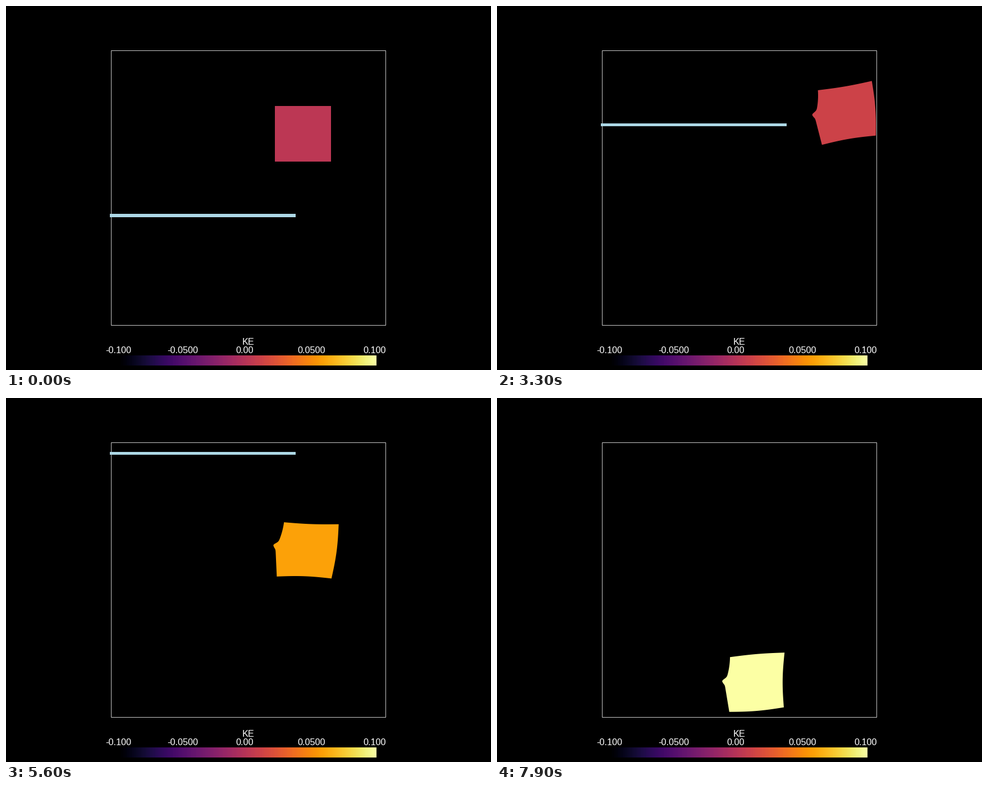
A matplotlib script that plays this animation: 864 by 648 pixels, repeating every 8000 ms.

```python
import matplotlib.pyplot as plt
import numpy as np
from matplotlib.animation import FuncAnimation
from matplotlib.patches import Polygon, Rectangle

W, H, DPI = 864, 648, 100
FRAMES, STEP = 80, 0.1
LEFT, TOP, SIDE = 187.5, 79.5, 489
WALL, FLOOR = LEFT + SIDE - 1, TOP + SIDE - 0.5
GRAVITY = 48
BAR_TIP, BAR_TOP, BAR_SPEED = 515.5, 370.7, 48.95
CMAP = plt.get_cmap("inferno")

# Free flights: anchor time, (x, y, angle), velocity, angular acceleration
FLIGHTS = [
    (0.0, (528.75, 227.25, 0), (0, 0, 0), 0),
    (2.5, (598, 208.2, 62), (68, -31, 51.5), 0),
    (3.3, (623.3, 190.3, 83), (-37.3, -20, 8.7), -3.1),
    (7.9, (463, 506, 88), (-5, -125, -8), 0),
]
# Contacts between them (bar, wall, floor): start, end, vertical squash
CONTACTS = [(1.2, 1.52, 0.08), (2.8, 3.3, 0), (7.44, 7.9, 0.18)]


def ease(t, start, end):
    s = np.clip((t - start) / (end - start), 0, 1)
    return s * s * (3 - 2 * s)


def fly(k, t):
    """Position and velocity on flight k."""
    t0, pos, vel, turn = FLIGHTS[k]
    acc, d = np.array([0, GRAVITY, turn]), t - t0
    return pos + np.array(vel) * d + acc * d * d / 2, vel + acc * d


def state(t):
    """x, y and angle; a contact joins two flights with a cubic."""
    for k, (a, b, _) in enumerate(CONTACTS):
        if t <= a:
            return fly(k, t)[0]
        if t < b:
            (p, u), (q, v) = fly(k, a), fly(k + 1, b)
            d = b - a
            s = (t - a) / d
            return (p + (q - p) * s * s * (3 - 2 * s)
                    + d * s * (1 - s) * (u * (1 - s) - v * s))
    return fly(len(CONTACTS), t)[0]


def energy(t, e=1e-4):
    vx, vy, spin = (state(t + e) - state(t - e)) / (2 * e)
    speed = np.hypot(np.hypot(vx, vy), 1.63 * spin)
    return 0.1 * (speed / 124) ** 2.3


def bar_top(t):
    return BAR_TOP - BAR_SPEED * t


def edge(a, b, s, offset):
    """Points from a to b, pushed outward by offset."""
    normal = 1j * (b - a) / abs(b - a)
    return a + (b - a) * s + normal * offset


def outline(t):
    x, y, angle = state(t)
    hurt = ease(t, 1.2, 1.5)

    # Slightly sheared square, from bottom-left round to top-left
    half = 49.75 - hurt
    shear = np.exp(1j * np.radians(2.75) * hurt)
    u, v = half * shear, 1j * half / shear
    corners = [v - u, v + u, u - v, -u - v]

    # The struck edge swells towards a small nub; the others bow
    s = np.linspace(0, 1, 121)
    swell = np.minimum(8 * (s / 0.46) ** 2, 17.5 * (1 - s))
    nub = 6 * np.exp(-((s - 0.435) / 0.05) ** 2)
    offsets = [(swell + nub) * ease(t, 1.2, 1.8)]
    bow = -hurt + 2 * ease(t, 1.5, 2.6) - 2 * ease(t, 7.44, 7.9)
    offsets += [b * bow * np.sin(np.pi * s) for b in (-2.3, 2.7, -1.5)]

    z = np.concatenate([edge(corners[k], corners[(k + 1) % 4], s, offset)
                        for k, offset in enumerate(offsets)])
    z = z * np.exp(1j * np.radians(angle))
    q = sum(amount * np.sin(np.pi * np.clip((t - a) / (b - a), 0, 1))
            for a, b, amount in CONTACTS)
    px, py = x + z.real * (1 + q / 2), y + z.imag * (1 - q)

    # Obstacles hold the material back
    if t < 2:
        py = np.where(px < BAR_TIP, np.minimum(py, bar_top(t)), py)
    return np.column_stack([np.minimum(px, WALL), np.minimum(py, FLOOR)])


fig = plt.figure(figsize=(W / DPI, H / DPI), dpi=DPI, facecolor="black")
ax = fig.add_axes([0, 0, 1, 1])
ax.axis("off")

ax.imshow(np.linspace(0, 1, 256)[None], cmap=CMAP, extent=(204, 660, 640, 622),
          aspect="auto", interpolation="nearest")
ax.set_xlim(0, W)
ax.set_ylim(H, 0)

ax.add_patch(Rectangle((LEFT, TOP), SIDE, SIDE, fill=False, ec="#c8c8c8",
                       lw=72 / DPI, snap=False, zorder=2))


def label(x, y, text):
    ax.text(x, y, text, color="white", family="Liberation Sans",
            size=16.2 * 72 / DPI, ha="center", va="baseline")


label(432, 603, "KE")
for x, text in [(200, "-0.100"), (314.5, "-0.0500"), (425, "0.00"),
                (544, "0.0500"), (656.5, "0.100")]:
    label(x, 617.5, text)

block = ax.add_patch(Polygon(outline(0), closed=True, lw=0, zorder=3))
bar = ax.add_patch(Rectangle((185, 0), BAR_TIP - 185, 4.4, fc="#add8e6", lw=0,
                             snap=False, antialiased=False, zorder=4))


def update(i):
    t = i * STEP
    block.set_xy(outline(t))
    block.set_facecolor(CMAP(min(0.5 + energy(t) / 0.2, 1.0)))
    bar.set_y(bar_top(t))
    return block, bar


anim = FuncAnimation(fig, update, frames=FRAMES, interval=1000 * STEP,
                     repeat=True, repeat_delay=0)
plt.show()
```
